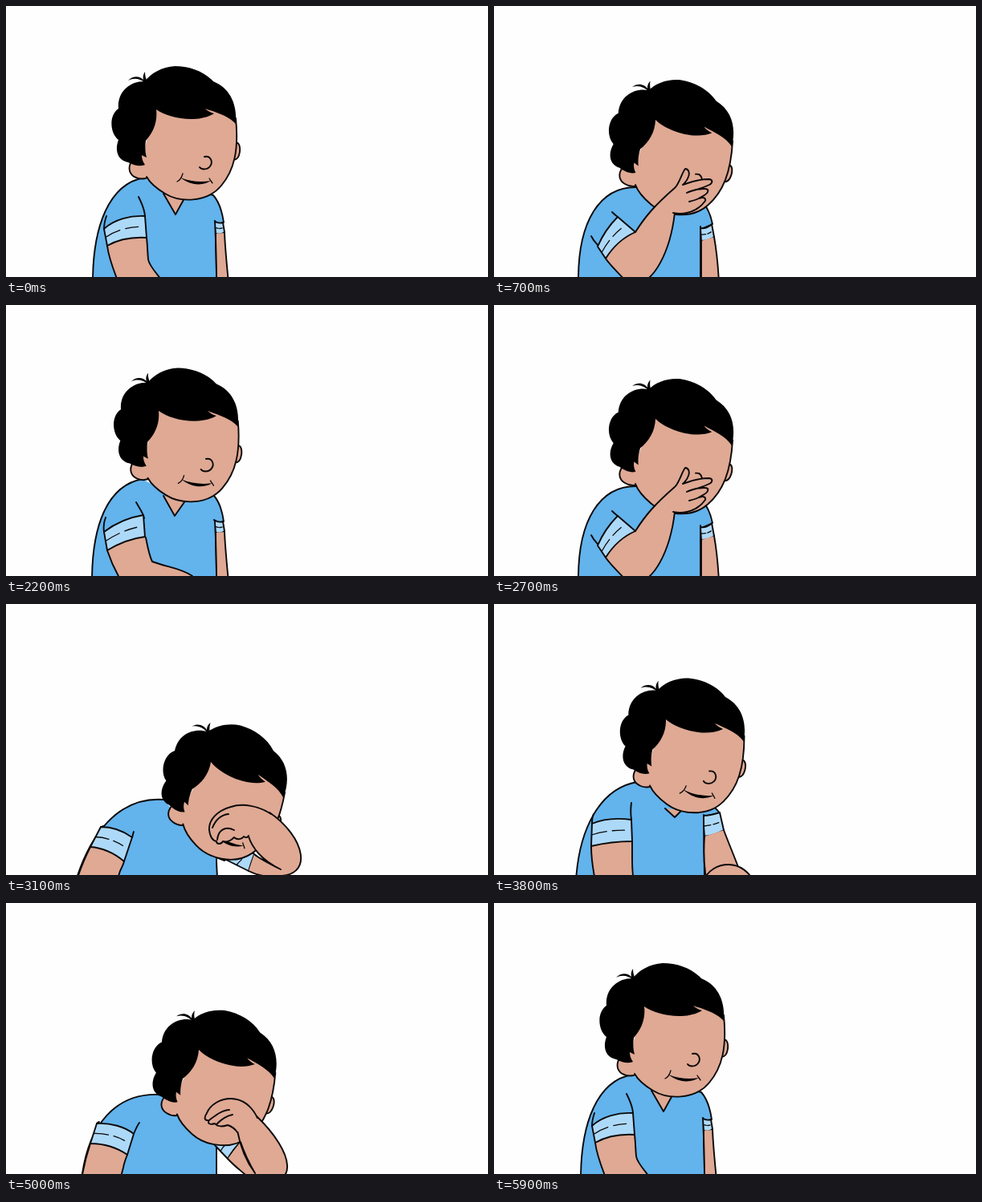
These frames come from a looping animation (600x338 px, 7800 ms). An HTML page:

```html
<!DOCTYPE html>
<html lang="en">
<head>
<meta charset="utf-8">
<title>Boy wiping his face</title>
<style>
  html, body { margin: 0; width: 100%; height: 100%; overflow: hidden; background: #fefefe; }
  svg { display: block; width: 100vw; height: 100vh; }
  .line { fill: none; stroke: #0b0808; stroke-width: 1.9; stroke-linecap: round; stroke-linejoin: round; }
  .thin { stroke-width: 1.3; }
  .skin { fill: #dfa994; }
  .shirt { fill: #63b3ec; }
  .cuff { fill: #add9f8; }
  .none { fill: none; }
</style>
</head>
<body>
<svg viewBox="0 0 600 338" preserveAspectRatio="xMidYMid slice">
  <g id="back"></g>
  <g id="head">
    <path class="line skin" d="M284 171C289 168 292 174 291 182C290 189 287 192 283 192"/>
    <path class="line skin" d="M156 194C151 203 154 211 162 214C169 217 176 215 181 212"/>
    <path class="skin" d="M172 180L187 120L250 116L280 126L286 140C290 180 284 205 268 224C250 246 216 245 198 234C188 228 180 222 175 213L160 196Z"/>
    <path class="line" d="M286 140C290 180 284 205 268 224C250 246 216 245 198 234C188 228 180 222 175 213"/>
    <path d="M286 147C288 124 280 103 258 94C246 81 228 75 210 75C194 76 180 84 173 94C156 93 138 106 140 128C128 136 129 158 140 167C135 180 139 193 152 195C158 198 166 201 173 198C170 194 169 190 169 186L175 189C173 182 173 174 174 168C183 158 189 145 187 129C202 140 238 147 259 134C255 133 251 131 248 128C262 133 277 137 286 147Z"/>
    <path d="M174 96C167 91 160 89 152 93C159 86 167 88 171 92C170 88 171 85 173 82C173 87 174 91 176 94Z"/>
    <path class="line" d="M247 188C255 186 258 195 254 200C250 205 243 204 241 201"/>
    <g id="mouth">
      <path class="line thin" d="M220 209C219 213 217 217 213 219M253 215C254 217 256 219 257 221"/>
      <path d="M217 214C229 219 243 220 255 218C246 224 231 225 217 214Z"/>
    </g>
  </g>
  <g id="front"></g>
</svg>
<script>
const NUM = /-?\d+(\.\d+)?/g;
const nums = s => s.match(NUM).map(Number);
const blend = (a, b, t) => {
  const to = nums(b);
  let i = 0;
  return a.replace(NUM, m => +(+m + (to[i++] - m) * t).toFixed(2));
};
const mix = (p, q, t) =>
  Object.fromEntries(Object.keys(p).map(k => [k, blend(p[k], q[k], t)]));
const shift = (s, dx, dy) => {
  let i = 0;
  return s.replace(NUM, m => +m + (i++ % 2 ? dy : dx));
};

const palm = 'M226 226 C232 218 234 208 238 203 C242 203 244 208 242 213 C240 219 238 220 235 223 C245 219 258 216 268 216 C273 217 272 221 268 223 C262 226 258 227 252 229 C258 228 264 227 266 229 C268 233 262 236 255 240 C260 238 264 239 263 243 C258 250 250 256 240 258 C232 260 228 259 223 258';
const palmLines = 'M252 229 C248 230 244 231 240 233 M255 240 C251 242 247 243 243 244';
const fist = 'M313 268 C306 253 294 244 280 244 C266 244 254 252 250 262 C246 268 247 272 253 271 C250 275 254 277 260 275 C264 280 270 279 276 277 C282 279 286 283 288 286';
const fistLines = 'M254 270 C262 264 270 258 278 258 M262 276 C268 270 276 265 282 264';
const leftHand = (dx, dy) => ({ lh: shift(palm, dx, dy), lhl: shift(palmLines, dx, dy) });
const rightHand = (dx, dy) => ({ rh: shift(fist, dx, dy), rhl: shift(fistLines, dx, dy) });

// head: hairline point, tilt, mouth shown; l* / r*: arms at the left / right of the stage
const rest = {
  head: '187 129 0 1',
  torso: 'M172 214 C128 222 108 275 108 345 M262 345 C262 310 261 290 260 268',
  neck: 'M196 234 L211 260 L222 240',
  ll: 'M165 238 C171 250 173 256 173 263 M125 262 C123 268 122 272 122 278',
  lc: 'M122 278 C135 266 155 261 173 262 L175 289 C158 288 140 291 126 299',
  lf: 'M126 299 C128 315 134 330 140 345 C150 350 165 352 180 352 M196 345 C188 334 178 324 177 316 C176 305 176 297 175 289',
  rs: 'M178 214 L258 236 C266 245 269 256 271 270 L260 275 L190 250',
  rc: 'M259 268 C263 271 267 271 270 270 L272 282 C269 285 265 285 261 284',
  rf: 'M261 284 C261 300 262 320 262 338 C262 345 263 350 264 353 M275 353 C276 352 277 350 277 345 C275 325 273 305 272 283',
  ...leftHand(-30, 150), ...rightHand(-15, 125)
};
const start = {
  ...rest,
  head: '190 132 1 1',
  torso: 'M170 217 C126 225 107 275 107 345 M262 345 C262 310 261 290 260 270',
  neck: 'M196 238 L210 263 L224 243',
  ll: 'M162 246 C167 255 171 260 172 266 M124 265 C122 270 121 276 122 283',
  lc: 'M122 283 C135 273 152 265 171 262 L173 289 C157 291 141 297 126 306',
  lf: 'M126 306 C130 318 136 332 144 345 C160 355 200 355 225 350 M232 338 C218 328 200 327 182 320 C178 312 176 300 174 290',
  rs: 'M178 217 L259 238 C266 246 269 256 271 270 L260 275 L190 254',
  ...leftHand(0, 150)
};
const wipe = {
  head: '201 142 9 0',
  torso: 'M178 226 C132 225 104 268 105 345 M257 345 C257 320 257 300 257 275',
  neck: 'M210 240 L220 248 L230 242',
  ll: 'M147 257 C149 259 151 261 154 263 M121 287 C123 291 126 295 129 298',
  lc: 'M129 300 C135 286 144 273 154 263 L176 282 C162 288 149 299 139 315',
  lf: 'M139 315 C145 324 156 334 168 347 C200 352 220 302 225 258 M226 226 C210 240 203 247 196 255 C188 264 181 274 176 282',
  rs: 'M184 225 L260 245 C267 253 270 262 272 272 L258 278 L195 260',
  rc: 'M257 277 C262 278 268 276 271 272 L274 288 C269 292 263 293 258 293',
  rf: 'M258 293 C258 305 258 320 258 338 C258 345 260 350 262 353 M278 353 C279 352 280 350 280 345 C279 325 277 305 274 288',
  ...leftHand(0, 0), ...rightHand(-15, 125)
};
const lift = {
  ...mix(start, wipe, 0.5),
  head: '196 137 5 1',
  ll: 'M160 254 C161 257 162 259 162 262 M122 279 C123 285 125 291 127 296',
  lc: 'M127 296 C133 281 146 268 162 262 L176 284 C160 288 146 300 133 314',
  lf: 'M133 314 C138 325 146 338 155 345 C190 355 222 335 233 310 M236 278 C215 290 200 296 190 300 C184 298 178 290 176 284',
  ...leftHand(10, 52)
};
const rub = {
  head: '240 183 10.5 0',
  torso: 'M192 239 C138 236 102 275 94 345 M262 345 C262 335 262 320 262 306',
  neck: 'M250 285 L258 290 L265 285',
  ll: 'M166 274 C163 278 161 283 159 288 M116 273 C115 273 114 274 113 275',
  lc: 'M113 275 C130 274 148 279 159 288 L151 314 C138 305 122 300 105 300',
  lf: 'M105 300 C101 312 97 325 94 345 C105 352 125 352 138 350 M143 345 C143 340 145 334 146 330 C147 324 149 319 151 314',
  rs: 'M210 245 L270 285 C275 288 280 290 284 292 L262 306 L210 290',
  rc: 'M258 300 C262 292 272 290 280 288 L292 298 C287 303 281 310 276 319',
  rf: 'M276 319 C284 328 294 335 305 345 C370 360 358 310 312 266 M288 284 C290 295 296 318 310 337 C303 325 296 310 292 298',
  ...leftHand(-60, 150), ...rightHand(0, 0)
};
const swap = {
  ...mix(wipe, rub, 0.5),
  lf: 'M122 308 C124 320 130 335 140 345 C160 355 180 360 195 368 M198 336 C190 325 177 322 168 316 C165 310 164 304 163 298',
  rf: 'M267 306 C274 322 284 336 296 347 C335 362 352 350 325 323 M300 341 C299 338 297 332 295 326 C292 315 288 303 283 293',
  ...leftHand(-28, 110), ...rightHand(12, 55)
};
const bury = {
  head: '255 197 16 1',
  torso: 'M196 244 C138 240 104 290 87 345 M263 345 C263 335 262 328 262 318',
  neck: 'M258 300 L265 305 L272 300',
  ll: 'M159 284 C158 286 158 289 157 291 M121 277 C120 277 119 278 118 278',
  lc: 'M118 278 C133 278 146 283 157 291 L147 321 C135 311 120 304 105 303',
  lf: 'M105 303 C99 315 93 328 88 345 C100 352 120 352 130 350 M138 345 C140 340 141 336 142 333 C144 329 146 325 147 321',
  rs: 'M220 250 L280 295 C288 298 295 300 300 304 L272 320 L220 300',
  rc: 'M272 318 C280 312 292 308 300 304 L309 312 C306 320 304 326 302 333',
  rf: 'M302 333 C312 338 322 341 335 339 C385 342 372 290 328 260 M302 290 C306 303 318 320 342 331 C328 324 316 318 309 312',
  ...leftHand(-60, 150),
  rh: 'M330 262 C315 252 295 248 280 253 C262 258 252 270 253 282 C254 290 256 295 262 296 C262 300 268 300 270 296 C276 298 280 295 284 291 C288 295 294 293 296 290 C299 292 301 291 302 289',
  rhl: 'M263 294 C264 283 272 276 284 282 M257 279 C261 269 268 263 277 262'
};
const lower = {
  head: '214 144 5.5 1',
  torso: 'M178 222 C132 230 106 280 102 345 M262 345 C262 320 261 300 261 263',
  neck: 'M213 255 L225 266 L234 257',
  ll: 'M171 248 C170 255 170 262 171 269 M124 262 C122 266 122 270 122 274',
  lc: 'M122 274 C138 267 156 267 171 269 L172 296 C155 296 138 298 121 302',
  lf: 'M121 302 C121 316 123 330 126 345 C140 350 160 352 170 350 M174 345 C172 335 172 325 172 318 C172 310 172 303 172 296',
  rs: 'M186 224 L268 248 C274 253 278 256 281 261 L261 265 L200 255',
  rc: 'M260 264 C268 264 275 262 281 260 L286 282 C279 286 270 289 262 290',
  rf: 'M262 290 C261 305 261 320 263 335 C264 340 265 345 267 350 M312 350 C310 342 306 334 304 328 C298 312 292 298 286 282',
  ...leftHand(-40, 150), ...rightHand(12, 81)
};
const drop = { ...mix(rub, lower, 0.5), rf: swap.rf, ...rightHand(12, 55) };

// Way up: phase 0 to 10
const keys = [[0, rest], [0.3, start], [2.5, lift], [4.6, wipe], [6, wipe], [7, swap], [8, rub], [10, bury]];
function rise(p) {
  const i = keys.findIndex(k => k[0] >= p);
  if (i < 1) return rest;
  const [a, from] = keys[i - 1], [b, to] = keys[i];
  return mix(from, to, (p - a) / (b - a));
}

// Each round: first step, phase offset, first step back, poses on the way back
const rounds = [
  [43, 1, 56, [rub, rub, lower]],
  [22, 0.3, 36, [mix(bury, rub, 0.6), drop, lower]],
  [2, 1, 16, [rub, lower]]
];
function poseAt(step) {
  const round = rounds.find(r => step >= r[0]);
  if (!round) return rest;
  const [first, offset, back, down] = round;
  if (step >= back) return down[step - back] || rest;
  const i = step - first;
  return i >= 9 ? bury : rise(i + offset);
}

const byId = id => document.getElementById(id);
function add(parent, cls) {
  const el = document.createElementNS('http://www.w3.org/2000/svg', 'path');
  el.setAttribute('class', cls);
  byId(parent).append(el);
  return el;
}
const parts = [
  ['back', 'rs', 'shirt'], ['back', 'rc', 'cuff'], ['back', 'torso', 'shirt'], ['back', 'neck', 'skin'],
  ['front', 'll', 'none'], ['front', 'lf', 'skin'], ['front', 'lc', 'cuff'],
  ['front', 'lh', 'skin'], ['front', 'lhl', 'none'],
  ['front', 'rf', 'skin'], ['front', 'rh', 'skin'], ['front', 'rhl', 'none']
].map(([parent, key, color]) => {
  const part = { key, fill: add(parent, color), line: add(parent, 'line') };
  if (color === 'cuff') {
    part.fold = add(parent, 'line thin');
    part.fold.setAttribute('pathLength', 100);
    part.fold.setAttribute('stroke-dasharray', '38 14 30 18');
  }
  return part;
});

// Crease halfway between the two edges of a cuff
function crease(d) {
  const n = nums(d);
  const at = i => `${(n[2 * i] + n[14 - 2 * i]) / 2} ${(n[2 * i + 1] + n[15 - 2 * i]) / 2}`;
  return `M${at(0)} C${at(1)} ${at(2)} ${at(3)}`;
}

// The forearm's skin runs on under the cuff
function underCuff(d) {
  const n = nums(d);
  return ` L${n[6]} ${n[7]} L${n[0]} ${n[1]}`;
}

function draw(pose) {
  for (const { key, fill, line, fold } of parts) {
    const d = pose[key];
    const area = d.replace(/ M/g, ' L');
    fill.setAttribute('d', key === 'lf' ? area + underCuff(pose.lc) : area);
    line.setAttribute('d', fold ? d + ' Z' : d);
    if (fold) fold.setAttribute('d', crease(d));
  }
  const [x, y, tilt, mouth] = nums(pose.head);
  byId('head').setAttribute('transform', `translate(${x} ${y}) rotate(${tilt}) translate(-187 -129)`);
  byId('mouth').style.display = mouth > 0.5 ? '' : 'none';
}

// Keep the colour of skin shapes that also carry an outline
document.querySelectorAll('.line.skin').forEach(el => { el.style.fill = getComputedStyle(el).fill; });

let begin, shown = -1;
function tick(now) {
  begin ??= now;
  const step = Math.floor(((now - begin) % 7800) / 100);
  if (step !== shown) draw(poseAt(shown = step));
  requestAnimationFrame(tick);
}
draw(rest);
requestAnimationFrame(tick);
</script>
</body>
</html>
```
